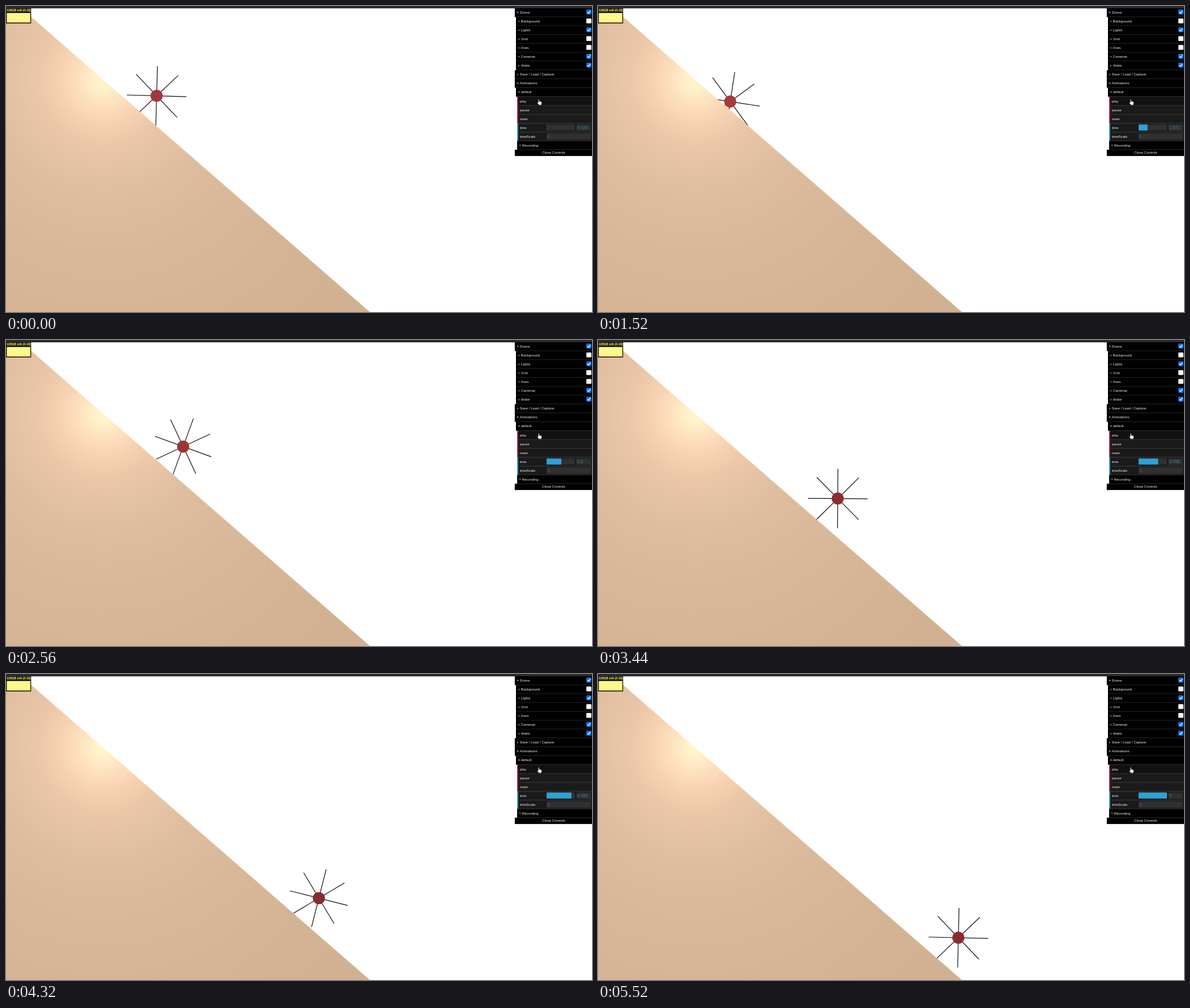
Animation of 994x520 px, one loop 5600 ms. Source, as an HTML page:

```html
<!DOCTYPE html>
<html lang="en">
<head>
<meta charset="utf-8">
<title>Rimless wheel</title>
<style>
html, body { margin: 0; width: 100%; height: 100%; overflow: hidden; background: #fff; }
svg { display: block; width: 994px; height: 520px; }
text { font-family: "Liberation Sans", Arial, sans-serif; font-size: 6px; fill: #eee; white-space: pre; }
</style>
</head>
<body>
<svg id="stage" viewBox="0 0 994 520" xmlns="http://www.w3.org/2000/svg">
  <defs>
    <radialGradient id="glow" gradientUnits="userSpaceOnUse" cx="165" cy="126" r="600">
      <stop offset="0" stop-color="#fff6cc"/>
      <stop offset=".025" stop-color="#fff1c9"/>
      <stop offset=".055" stop-color="#fee6c2"/>
      <stop offset=".09" stop-color="#fcdaba"/>
      <stop offset=".13" stop-color="#f5d0b1"/>
      <stop offset=".18" stop-color="#ecc8a9"/>
      <stop offset=".24" stop-color="#e5c3a4"/>
      <stop offset=".32" stop-color="#dfbe9f"/>
      <stop offset=".46" stop-color="#dab99a"/>
      <stop offset=".7" stop-color="#d5b496"/>
      <stop offset="1" stop-color="#d1b092"/>
    </radialGradient>
  </defs>
  <rect width="994" height="520" fill="#fff"/>
  <g id="wheel">
    <path id="legs" stroke="#111" stroke-width="1.2" fill="none"/>
    <circle id="hub" r="10.4"/>
  </g>
  <path d="M0 -18.7L617.2 520H0Z" fill="url(#glow)"/>
  <rect width="994" height="4" fill="#2b2a2f"/>
  <g id="stats">
    <rect y="4" width="42.6" height="25.6" fill="#222208"/>
    <rect x="1.4" y="12" width="39.8" height="16" fill="#fdf88c"/>
    <text x="1" y="9.4" style="font-size:4.9px;font-weight:bold;fill:#f3ee7c">129528 m% (0-18)</text>
  </g>
  <g id="panel"></g>
  <path id="hand" transform="translate(900.5 158)" fill="#fff" stroke="#222" stroke-width=".6" stroke-linejoin="round"
    d="M2.4 1.2Q3.2 .4 4 1.2V4.2L5 4L6 4.5L7 4.6L8.2 5.2V8L7.3 10.2H3.3L.6 6.6Q.6 5.6 1.5 5.8L2.4 6.6Z"/>
</svg>
<script>
const $ = id => document.getElementById(id);
const NS = "http://www.w3.org/2000/svg";
const panel = $("panel");

function add(tag, attrs, text) {
  const el = document.createElementNS(NS, tag);
  for (const k in attrs) el.setAttribute(k, attrs[k]);
  if (text !== undefined) el.textContent = text;
  panel.appendChild(el);
  return el;
}
const rect = (x, y, width, height, fill, rx = 0) => add("rect", { x, y, width, height, fill, rx });
const label = (x, y, s, style = "") => add("text", { x, y, style }, s);

// Control panel: [text, left edge, kind, text x]
const rows = [
  ["Scene", 863, "open", 871.5, 1], ["Background", 865, "shut", 873.5, 0],
  ["Lights", 865, "shut", 873.5, 1], ["Grid", 865, "shut", 873.5, 0],
  ["Axes", 865, "shut", 873.5, 0], ["Cameras", 865, "shut", 873.5, 1],
  ["drake", 865, "shut", 873.5, 1], ["Save / Load / Capture", 863, "shut", 871.5],
  ["Animations", 863, "open", 871.5], ["default", 865, "open", 873.5],
  ["play", 867, "func", 871.5], ["pause", 867, "func", 871.5], ["reset", 867, "func", 871.5],
  ["time", 867, "num", 871.5], ["timeScale", 867, "num", 871.5], ["Recording", 867, "shut", 875.5]
];

function checkbox(y, on) {
  rect(984.4, y - 4.2, 8.6, 8.4, on ? "#0b74f5" : "#fff", 1.3);
  if (on) add("path", { d: `M986.3 ${y + .2}l1.8 1.9l3.3 -4.1`, stroke: "#fff", "stroke-width": 1.3, fill: "none" });
}

rows.forEach(([name, x, kind, tx, checked], i) => {
  const y = 3.8 + i * 15.03, mid = y + 7.5;
  const folder = kind === "open" || kind === "shut";
  rect(x, y, 994 - x, 15.1, folder ? "#000" : name === "play" ? "#111" : "#1a1a1a");
  rect(x, y + 14.4, 994 - x, .7, folder ? "#333" : "#2c2c2c");
  if (!folder) rect(867, y, 1.8, 15.1, kind === "func" ? "#b51d50" : "#2fa1d6");
  const ax = tx - 3.9;
  if (kind === "open") add("path", { d: `M${ax - 1} ${mid - 1}h3l-1.5 1.9z`, fill: "#eee" });
  if (kind === "shut") add("path", { d: `M${ax - .2} ${mid - 1.4}v2.6l1.6 -1.3z`, fill: "#eee" });
  label(tx, mid + 1.9, name);
  if (checked !== undefined) checkbox(mid - 1, checked);
});
rect(863, 244.2, 131, 10.7, "#000");
label(909.2, 251.2, "Close Controls");

rect(917, 201.4, 48, 10.2, "#303030");
const fill = rect(917, 201.4, 0, 10.2, "#2fa1d6");
rect(967.5, 201.4, 24.8, 10.8, "#303030");
const readout = label(968.7, 209.3, "", "font-size:7.2px;fill:#2c86b2");
rect(917, 216.4, 75.3, 10.8, "#303030");
label(918.6, 224.2, "1", "font-size:7.2px;fill:#4b6f82");

// Rimless wheel: stance-leg pendulum with a plastic impact at each step
const LOOP = 5600, FRAME = 80, LEG = 50.55, RATE2 = 9.23;
const SLOPE = Math.atan(502 / 575), HALF = Math.PI / 8;
const STRIDE = 2 * LEG * Math.sin(HALF), TOE = [254.1, 203.2];
const DT = 0.0005;

// The wheel first makes one full turn about its starting toe.
function simulate(t) {
  let angle = -2 * Math.PI, speed = 1.154, step = 0;
  for (let n = Math.round(t / DT); n > 0; n--) {
    speed += RATE2 * Math.sin(angle) * DT / 2;
    angle += speed * DT;
    speed += RATE2 * Math.sin(angle) * DT / 2;
    if (angle > SLOPE + HALF) {
      angle -= 2 * HALF;
      speed *= Math.cos(2 * HALF);
      step++;
    }
  }
  return { angle, step };
}

// Playback clock: [page ms, animation s]
const clock = [[0, .024], [560, .6], [1520, 1.571], [2560, 2.6], [3440, 3.456], [4320, 4.399], [4921, 5], [LOOP, 5]];
function playTime(ms) {
  const i = clock.findIndex(p => p[0] > ms);
  const [a, u] = clock[i - 1], [b, v] = clock[i];
  return u + (v - u) * (ms - a) / (b - a);
}

const mix = (a, b, k) => Math.round(a + (b - a) * k);

function draw(ms) {
  const t = playTime(ms), { angle, step } = simulate(t);
  const x = TOE[0] + step * STRIDE * Math.cos(SLOPE) + LEG * Math.sin(angle);
  const y = TOE[1] + step * STRIDE * Math.sin(SLOPE) - LEG * Math.cos(angle);
  let d = "";
  for (let i = 0; i < 4; i++) {
    const a = angle + i * Math.PI / 4, dx = LEG * Math.sin(a), dy = -LEG * Math.cos(a);
    d += `M${x - dx} ${y - dy}L${x + dx} ${y + dy}`;
  }
  $("legs").setAttribute("d", d);
  const hub = $("hub"), k = Math.max(0, Math.min(1, (x - 225) / 190));
  hub.setAttribute("cx", x);
  hub.setAttribute("cy", y);
  hub.setAttribute("fill", `rgb(${mix(168, 136, k)},${mix(57, 44, k)},${mix(60, 47, k)})`);
  fill.setAttribute("width", 48 * t / 5);
  readout.textContent = String(+t.toFixed(3));
  readout.style.fill = t < 5 ? "#2c86b2" : "#4b6f82";
}

const start = performance.now();
function tick() {
  const ms = (performance.now() - start) % LOOP;
  draw(Math.floor(ms / FRAME) * FRAME);
  requestAnimationFrame(tick);
}
tick();
</script>
</body>
</html>
```
